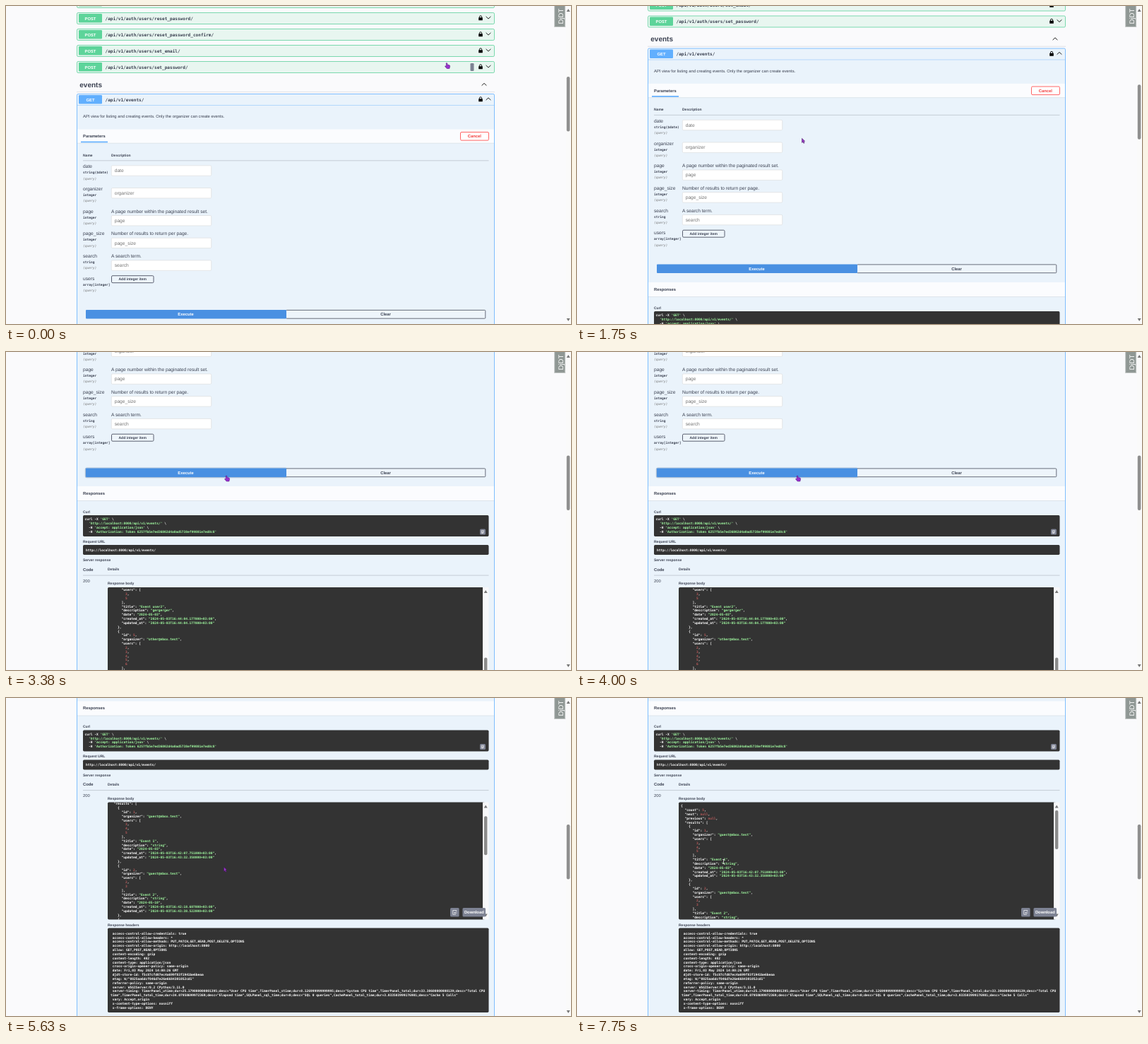
An HTML page for the animation above (8000 ms loop, 800 by 450 pixels).

```html
<!DOCTYPE html>
<html lang="en">
<head>
<meta charset="utf-8">
<title>API docs</title>
<style>
html, body { margin: 0; width: 100%; height: 100%; overflow: hidden; background: #fafafc; }
svg { display: block; width: 800px; height: 450px; }
text { font-family: "Liberation Sans", Arial, sans-serif; fill: #3b4151; white-space: pre; text-rendering: geometricPrecision; }
.b { font-weight: bold; }
.m { font-family: "DejaVu Sans Mono", monospace; }
.i { font-style: italic; }
.c { text-anchor: middle; }
.w { fill: #fff; }
.g { fill: #757575; }
.r { fill: #f23c3c; }
.str { fill: #a2fca2; }
.num { fill: #b95a5a; }
</style>
</head>
<body>
<svg id="stage" viewBox="0 0 800 450"></svg>
<script>
const LOOP = 8000, TICK = 125, LINE = 5.833;
const PX14 = 5.83, PX16 = 6.67, PX12 = 5, CODE = 4.57, PATH = 6.09;

// y is the visual middle of the text
const text = (x, y, s, size, cls = '') =>
  `<text x="${x}" y="${y + size * .35}" font-size="${size}" class="${cls}">${s}</text>`;
const rect = (x, y, w, h, fill, stroke = 'none', r = 0, extra = '') =>
  `<rect x="${x}" y="${y}" width="${w}" height="${h}" rx="${r}" fill="${fill}" stroke="${stroke}" ${extra}/>`;
const line = (x1, x2, y, color, w = .6) =>
  `<path d="M${x1} ${y}H${x2}" stroke="${color}" stroke-width="${w}"/>`;
const chevron = (x, y, dir) =>
  `<path d="M${x - 3.4} ${y - 1.6 * dir}l3.4 ${3.2 * dir} 3.4 ${-3.2 * dir}" fill="none" stroke="#222"/>`;
const lock = y =>
  rect(669.2, y - .8, 5.6, 4, '#000', 'none', .5) +
  `<path d="M670.4 ${y}v-1.6a1.6 1.6 0 0 1 3.2 0v1.6" fill="none" stroke="#000" stroke-width=".9"/>`;
const triangle = (x, y, dir) =>
  `<path d="M${x - 2.5} ${y + 2 * dir}h5l-2.5 ${-4 * dir}z" fill="#777"/>`;
const copyButton = (x, y, s) =>
  rect(x, y, s, s, '#7d8293', 'none', 1.5) +
  `<g fill="none" stroke="#fff" stroke-width=".7">
    <path d="M${x + s * .62} ${y + s * .74}H${x + s * .3}V${y + s * .28}H${x + s * .68}v${s * .14}"/>
    <path d="M${x + s * .74} ${y + s * .56}H${x + s * .46}m1.2 -1.2l-1.2 1.2 1.2 1.2"/></g>`;
const darkBox = (x, y, w, h) => rect(x, y, w, h, '#333', 'none', 1.7);
const codeLines = (x, y, lines) =>
  lines.map((s, i) => text(x, y + i * LINE, s, CODE, 'm b w')).join('');

function row(y, method, path, color, dir) {
  return rect(103, y - 6.5, 33, 12.5, color, 'none', 1.3) +
    text(119.5, y, method, PX14, 'b c w') + text(140.5, y + .2, path, PATH, 'm b') +
    lock(y - .5) + chevron(683, y - 1, dir);
}

function postRows() {
  const base = '/api/v1/auth/users/';
  return ['reset_email_confirm/', 'reset_password/', 'reset_password_confirm/', 'set_email/', 'set_password/']
    .map((name, i) => {
      const y = -5.5 + 23 * i;
      return rect(100.5, y - 8, 591, 16, '#e8f6f0', '#49cc90', 1.7, 'stroke-width=".7"') +
        row(y, 'POST', base + name, '#5dd49a', 1);
    }).join('');
}

function params() {
  const list = [
    ['date', 'string($date)'],
    ['organizer', 'integer'],
    ['page', 'integer', 'A page number within the paginated result set.'],
    ['page_size', 'integer', 'Number of results to return per page.'],
    ['search', 'string', 'A search term.'],
    ['users', 'array[integer]'],
  ];
  return list.map(([name, type, note], i) => {
    const y = 227 + 31.7 * i, inputY = y + (note ? 13.3 : 6);
    const field = name === 'users'
      ? rect(149.5, y - 3.8, 59.5, 10, '#eef5fb', '#4b5060', 1.5, 'stroke-width=".9"') +
        text(179.2, y + 1.2, 'Add integer item', PX12, 'b c')
      : rect(149.3, inputY - 7.2, 141.4, 14.4, '#fff', '#d9d9d9', 1.5, 'stroke-width=".6"') +
        text(153.7, inputY - .2, name, PX16, 'g');
    return text(109, y, name, PX16) + text(109, y + 8.8, type, CODE, 'm b') +
      text(109, y + 17, '(query)', CODE, 'm i g') + (note ? text(149, y, note, PX16) : '') + field;
  }).join('');
}

function responseJson() {
  const first = 'guest@mbox.test', other = 'other@mbox.test', day = '2024-05-03T16:';
  const event = (id, organizer, users, title, description, date, created, updated) => ({
    id, organizer, users, title, description, date,
    created_at: day + created + '000+03:00', updated_at: day + updated + '000+03:00',
  });
  const results = [
    event(1, first, [3, 4, 5], 'Event 1', 'string', '2024-05-03', '42:07.751', '43:32.358'),
    event(2, first, [2, 3], 'Event 2', 'string', '2024-05-10', '42:18.607', '43:38.522'),
    event(3, first, [2, 3], 'Event 3', 'string', '2024-05-10', '42:28.310', '43:44.126'),
    event(4, other, [3, 5], 'Event user2', 'gergerger', '2024-05-03', '44:04.177', '44:04.177'),
    event(5, other, [2, 3, 4, 5, 6], 'Event user 6', 'rg4grerge', '2024-06-06', '44:34.450', '44:34.450'),
  ];
  return JSON.stringify({ count: 5, next: null, previous: null, results }, null, 2).split('\n')
    .map(s => s.replace(/("[^"]*"|\d+|null)(,?)$/, (_, value, comma) =>
      `<tspan class="${value[0] === '"' ? 'str' : 'num'}">${value}</tspan>${comma}`));
}

const curl = [
  `curl -X <tspan class="str">'GET'</tspan> \\`,
  `  <tspan class="str">'http://localhost:8000/api/v1/events/'</tspan> \\`,
  `  -H <tspan class="str">'accept: application/json'</tspan> \\`,
  `  -H <tspan class="str">'Authorization: Token 6257fb5e7ed36002d4a0ad5738ef99801e7ed8c8'</tspan>`,
];
const headers = ` access-control-allow-credentials: true
 access-control-allow-headers: *
 access-control-allow-methods: PUT,PATCH,GET,HEAD,POST,DELETE,OPTIONS
 access-control-allow-origin: http://localhost:8000
 allow: GET,POST,HEAD,OPTIONS
 content-encoding: gzip
 content-length: 402
 content-type: application/json
 cross-origin-opener-policy: same-origin
 date: Fri,03 May 2024 14:00:26 GMT
 djdt-store-id: f5c87cfd07ec4a699f83f1941be6beaa
 etag: W/"0825aa6dcf046d7e26e6684301052cd1"
 referrer-policy: same-origin
 server: WSGIServer/0.2 CPython/3.11.0
 server-timing: TimerPanel_utime;dur=25.179000000001395;desc="User CPU time",TimerPanel_stime;dur=8.126999999999995;desc="System CPU time",TimerPanel_total;dur=33.30600000000139;desc="Total CPU
time",TimerPanel_total_time;dur=34.07958699972369;desc="Elapsed time",SQLPanel_sql_time;dur=0;desc="SQL 0 queries",CachePanel_total_time;dur=3.033503999176901;desc="Cache 5 Calls"
 vary: Accept,origin
 x-content-type-options: nosniff
 x-frame-options: DENY`.split('\n');

const sectionHeader = (y, h, title) =>
  rect(101, y, 590, h, '#fbfcfe') + line(101, 691, y + h, '#d5dde4', .7) + text(109, y + 9.8, title, PX14, 'b');

const page = postRows() +
  rect(657.5, 81, 5, 11, '#7d8293', 'none', 1.3, 'id="rowCopy"') +
  text(104.3, 111, 'events', 10, 'b') + chevron(677, 111, -1) + line(100, 692, 121.7, '#cfd1d6') +
  rect(100.5, 124.5, 591, 900, '#eaf3fb', '#61affe', 1.7, 'stroke-width=".8"') +
  row(132.5, 'GET', '/api/v1/events/', '#61affe', -1) + line(101, 691, 140.5, '#8ec5fc') +
  text(109, 156.2, 'API view for listing and creating events. Only the organizer can create events.', PX14) +
  sectionHeader(174.4, 19.8, 'Parameters') + rect(106, 191.6, 38, 1.7, '#61affe') +
  rect(643.5, 178.5, 40, 11.6, '#fff', '#f55', 1.5, 'stroke-width=".9"') + text(663.3, 184.2, 'Cancel', PX14, 'b c r') +
  text(109, 210.8, 'Name', PX12, 'b') + text(149, 210.8, 'Description', PX12, 'b') + line(109, 683.5, 218.8, '#a9b1bb') +
  params() +
  rect(112.5, 429.6, 285, 13.4, 'none', '#5b7fa8', 2, 'id="execHover" stroke-width="1.4" opacity=".45"') +
  rect(396.5, 430.4, 282.3, 11.8, '#eef5fb', '#5a5f6c', 1, 'stroke-width=".9"') + text(537.5, 436.2, 'Clear', PX14, 'b c') +
  rect(113, 430, 284, 12.5, '#4990e2', 'none', 1) + text(254.5, 436.2, 'Execute', PX14, 'b c w') +
  sectionHeader(455.5, 20.5, 'Responses') +
  text(109, 491.5, 'Curl', PX12, 'b') + darkBox(109, 496.5, 574.5, 30) + codeLines(111.5, 502.2, curl) + copyButton(671, 516, 8) +
  text(109, 533.5, 'Request URL', PX12, 'b') + darkBox(109, 538.5, 574.5, 14) +
  codeLines(113, 545.6, ['http://localhost:8000/api/v1/events/']) +
  text(109, 559.8, 'Server response', PX12, 'b') +
  text(109, 573.2, 'Code', PX14, 'b') + text(144, 573.2, 'Details', PX12, 'b') + line(109, 683.5, 581.6, '#a9b1bb') +
  text(109, 589.3, '200', PX14) + text(144, 593, 'Response body', PX12, 'b') +
  darkBox(144, 598.5, 534, 166) + rect(675, 598.5, 8.5, 166, '#f7f8fa') +
  triangle(679.2, 604.5, 1) + triangle(679.2, 758.5, -1) +
  rect(677, 610, 4.4, 55, '#8b8b8b', 'none', 2, 'id="bodyThumb"') +
  `<g clip-path="url(#bodyClip)"><g id="json">${codeLines(147, 603.7, responseJson())}</g></g>` +
  copyButton(629, 748, 12.6) + rect(646.5, 748, 32.5, 12.6, '#7d8293', 'none', 1.5) + text(662.8, 754.3, 'Download', PX14, 'b c w') +
  text(144, 771.8, 'Response headers', PX12, 'b') + darkBox(144, 776.5, 539.5, 119.5) + codeLines(148, 784.1, headers);

document.getElementById('stage').innerHTML =
  `<clipPath id="bodyClip"><path d="M144 598.5H675V764.5H144z"/></clipPath>
  <g id="page">${page}</g>
  ${rect(776.7, -1, 15, 30.5, '#8f9794', '#c3c7c5', 0)}
  <text transform="translate(788.6 25.5) rotate(-90)" font-size="9.6" class="w">DjDT</text>
  ${rect(793, 0, 7, 450, '#fafafa')}${triangle(796.2, 6, 1)}${triangle(796.2, 444, -1)}
  ${rect(793.8, 100, 4.6, 77.5, '#8f8f8f', 'none', 2.2, 'id="pageThumb"')}
  <g id="cursor" stroke-width=".5">
    <path id="arrow" d="M-1 -3.2L3.2 .8 1.4 1.1 2.6 3.2 1.4 3.8 .4 1.7 -1 2.9z" fill="#9a35c8" stroke="#3a1455"/>
    <path id="hand" d="M-1.8 -3.6q.8 -.9 1.5 0l.3 2.2 2.6 .5q1.3 .5 1 1.8l-.7 3.1h-3.7l-2.6 -3q-.2 -1 1.2 -.6l.7 .5z" fill="#9a2fd0" stroke="#4a1272"/>
    <path id="beam" d="M-1.5 -3h3M0 -3V3M-1.5 3h3" fill="none" stroke="#ddd" stroke-width=".8"/>
  </g>`;

// Keys are [time, value, ...]; linear between keys, held outside them
function track(t, keys, k = 1) {
  const n = keys.findIndex(key => key[0] > t);
  if (n === 0) return keys[0][k];
  if (n < 0) return keys[keys.length - 1][k];
  const a = keys[n - 1], b = keys[n];
  return a[k] + (b[k] - a[k]) * (t - a[0]) / (b[0] - a[0]);
}
const pageScroll = [[1375, 0], [1875, 86], [2000, 86], [2375, 234], [2500, 234], [2625, 265.5], [4000, 265.5], [4250, 451]];
const bodyScroll = [[4750, 281.5], [5250, 115], [5375, 115], [5625, 26.3], [5875, 0]];
const pointer = [[0, 625, 84.5], [625, 319.5, 190.5], [3000, 319.5, 190.5], [3375, 313, 179],
  [4500, 313, 179], [4750, 309.5, 242.5], [5875, 309.5, 242.5], [6375, 207.5, 231.5]];

const el = id => document.getElementById(id);
const move = (id, x, y) => el(id).setAttribute('transform', `translate(${x} ${y})`);
const show = (id, on) => el(id).style.display = on ? '' : 'none';

function draw(now) {
  const t = Math.floor(now % LOOP / TICK) * TICK;
  const scroll = track(t, pageScroll), inner = track(t, bodyScroll);
  const x = track(t, pointer), y = track(t, pointer, 2);
  move('page', 0, -scroll);
  move('json', 0, -inner);
  move('pageThumb', 0, scroll * .175);
  move('bodyThumb', 0, inner * .3125);
  move('cursor', x, y);
  const onRow = y < 97;
  const onExecute = t >= 3250 && t <= 4000;
  const onText = t >= 6375;
  show('rowCopy', onRow);
  show('execHover', onExecute);
  show('hand', onRow || onExecute);
  show('beam', onText);
  show('arrow', !onRow && !onExecute && !onText);
  requestAnimationFrame(draw);
}
const start = performance.now();
(function frame() { draw(performance.now() - start); })();
</script>
</body>
</html>
```
